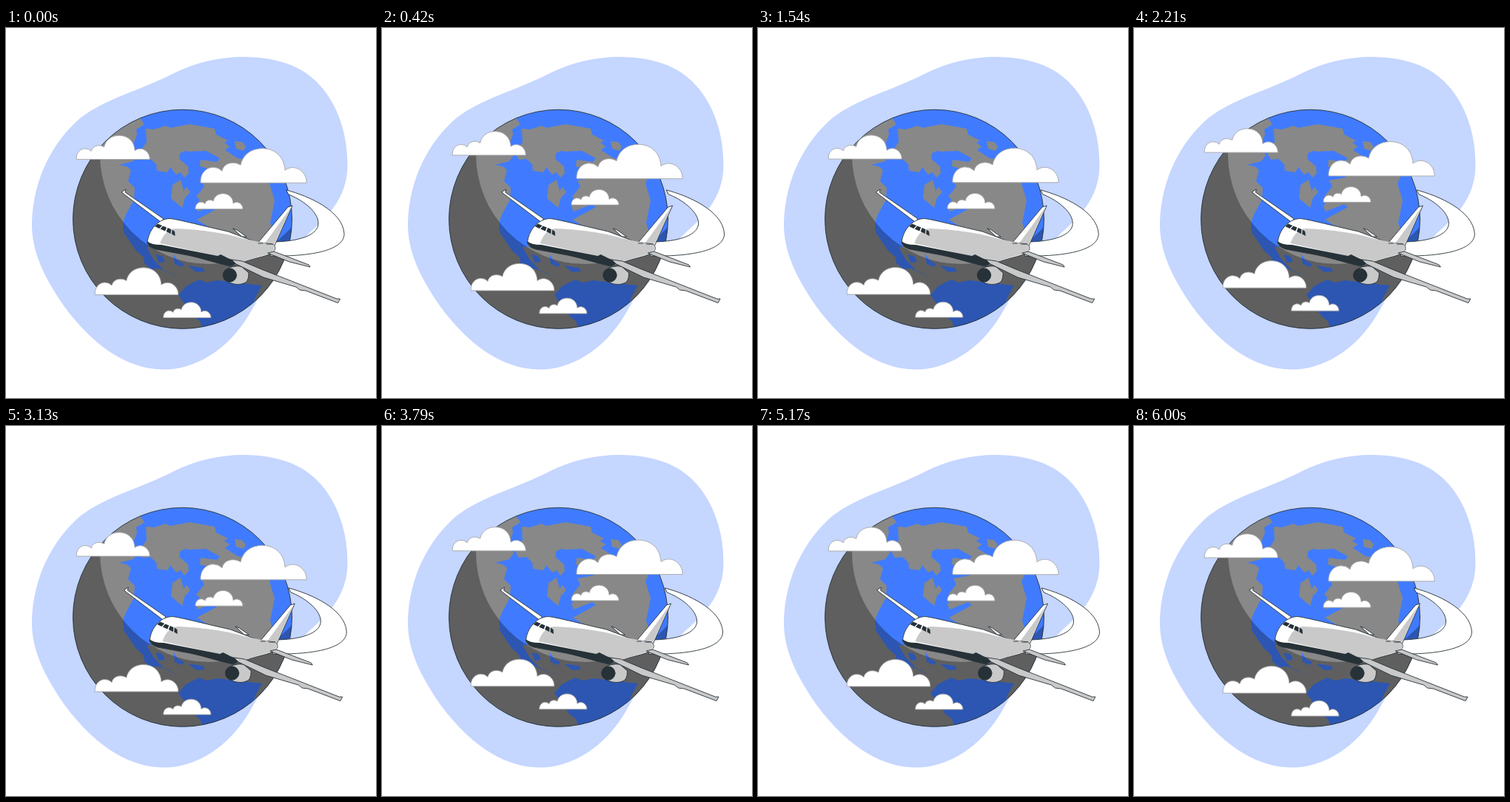
These frames come from a looping animation (500x500 px, 6.04 s). An HTML page:

```html
<!DOCTYPE html>
<html lang="en">
<head>
<meta charset="utf-8">
<title>Plane around the globe</title>
<style>
  html, body { margin: 0; width: 100%; height: 100%; overflow: hidden; background: #fff; }
  svg { display: block; width: 100%; height: 100%; }
  .ink { stroke: #263238; stroke-width: .9; stroke-linejoin: round; stroke-linecap: round; }
  .land { fill: #888; }
  .sea { fill: #407bff; }
  .white { fill: #fff; }
  .gray { fill: #c9c9c9; }
  .dark { fill: #263238; }
  .cloud { fill: #fff; stroke: #a6a6a6; stroke-width: .9; vector-effect: non-scaling-stroke; }
</style>
</head>
<body>
<svg viewBox="0 0 500 500">
  <defs>
    <clipPath id="disc"><circle cx="238.5" cy="258.3" r="148"/></clipPath>
    <path id="puff" class="cloud" d="M0 0C-1 -12 7 -21 17 -21Q24 -21 29 -16C31 -27 45 -30 54 -24C57 -38 68 -46.5 84 -46.5C101 -46 113 -35 114 -17C127 -27 144 -15 143 0Z"/>
  </defs>

  <path fill="#c5d6ff" d="M225 62C275 36 338 32 385 50C435 70 461 125 461.5 183C462 225 440 250 412 275C360 325 345 360 328 388C300 435 255 462 213 461.5C160 461 115 425 80 378C50 335 34 300 35 262C37 205 62 155 100 122C135 95 180 85 225 62Z"/>

  <g clip-path="url(#disc)">
    <rect class="sea" x="88" y="108" width="302" height="302"/>
    <!-- western land -->
    <path class="land" d="M181 121L187 130 176 137 177 144 171 160 178 172 172 180 153 185 163 187 169 192 165 207 174 216 173 232 162 252 158 263 159 276 175 300 186 310 187 318 196 326 207 325 240 340 270 410H60V100Z"/>
    <!-- northern land -->
    <path class="land" d="M189 136L200 137 216 132 222 135 248 130 271 134 282 136 284 144 300 152 295 155 302 160 296 165 313 176 325 178 325 171 365 190 356 210 363 233 357 263 361 276 350 300 300 285 258 259 289 242 284 238 259 248 256 241 262 232 257 228 268 214 264 206 286 202 284 193 262 187 263 178 285 181 289 176 270 166 247 167 241 166 235 170 234 177 246 187 247 196 241 202 236 195 230 198 222 188 218 195 204 193 203 184 195 177 185 178 180 169 190 154Z"/>
    <path class="land" d="M225 212L236 205 240 220 244 215 249 222 242 229 238 243 223 230Z"/>
    <path class="land" d="M309 153L319 154 324 160 321 166 311 163Z"/>
    <!-- southern land -->
    <path class="land" d="M190 296H400V410H230L228 334 213 327 199 312Z"/>
    <path class="sea" d="M243 349L261 340 271 344 286 341 346 348 336 366V410H267L262 396 254 390 233 361Z"/>
    <path class="sea" d="M202 306L211 308 215 315 207 318ZM226 305L232 314 241 319 238 323 228 319ZM246 321L266 324 269 329 257 330Z"/>
    <path class="sea" d="M361 282L372 275 390 266V290L365 291Z"/>
    <path d="M60 80H420V430H60ZM127 171a148 148 0 1 0 296 0a148 148 0 1 0 -296 0Z" fill-rule="evenodd" fill-opacity=".3"/>
  </g>
  <circle class="ink" cx="238.5" cy="258.3" r="148" fill="none"/>

  <g id="clouds"></g>

  <g id="plane">
    <path class="ink white" d="M379 219C409 227 455 247 457 278C457 302 407 309 357 308L359 289C395 289 422 280 422 264C422 247 398 231 382 225Z"/>
    <!-- far wing and far stabilizer -->
    <path class="ink white" d="M156.5 221.5L162 218 161 222 213 258 209 262 160 225Z"/>
    <path class="ink white" d="M307 271L312 273 325 282H319Z"/>
    <!-- tail fin -->
    <path class="ink white" d="M339 292L381 242 387 240 363 294Z"/>
    <path class="gray" d="M349 292L385 242.5 362.5 293Z"/>
    <!-- fuselage -->
    <path class="ink white" d="M191 290C192 274 205 258 221 257.5C230 258 260 266 300 275L337 289 360 292C365 295 365 300 360 303C352 309 340 310 328 314L304 322C285 318 270 312 245 307L202 299Q191 296 191 290Z"/>
    <path class="gray" d="M208 291C212 280 219 271 229 271C255 272 294 276 318 284L359 292.5C364 295 364 300 358 303C350 308 340 309 314 318L298 310 285 308Z"/>
    <path class="dark" d="M191 288Q195 293 210 293L286 308 290 306 300 311 315 317 304 322C287 319 267 312 245 307L202 299Q191 296 191 288Z"/>
    <path class="ink" fill="none" d="M341 291H347M352 292H360"/>
    <!-- cockpit windows -->
    <path class="dark" d="M201 268L205 264.5 211 267 207 271ZM208.5 271.5L212 267.5 217 269.5 215 274.5ZM216.5 275L218.5 270 223 272 222.5 278ZM224 278.5L224.5 272.5 228 275 228.5 281Z"/>
    <!-- near stabilizer -->
    <path class="ink gray" d="M354 304L362 302 409 320 411 323 383 316Z"/>
    <!-- engine -->
    <path class="ink gray" d="M301 324Q314 320 319 323L328 331Q328 344 321 345C314 348 305 346 300 343Z"/>
    <circle class="ink dark" cx="302.3" cy="334" r="9.2"/>
    <!-- near wing -->
    <path class="ink gray" d="M305 313L319 315 345 326 447 366 451.5 366 448.5 371.5 405 355 397 354 392 350 348 337 311 319Z"/>
  </g>
</svg>
<script>
  const LOOP = 6040;
  const clouds = document.getElementById('clouds');
  const plane = document.getElementById('plane');

  // left edge, baseline, width
  const puffs = [[95.2, 178, 99], [263, 209.8, 143], [256, 245.2, 64], [120.2, 361, 112.5], [212.8, 392, 64]];
  clouds.innerHTML = puffs.map(([x, y, w]) =>
    `<use href="#puff" transform="translate(${x} ${y}) scale(${w / 143})"/>`).join('');

  // Shake offsets, one key every 600 ms
  const shake = [-4, 4, -4, 2, -1, 0, -1, 2, -4, 4, -4];

  const shakeAt = ms => {
    const pos = ms / 600;
    const i = Math.min(Math.floor(pos), shake.length - 2);
    return shake[i] + (shake[i + 1] - shake[i]) * (pos - i);
  };

  const floatAt = ms => -10 * (1 - Math.abs((ms % 1500) / 750 - 1));

  function draw(now) {
    const t = now % LOOP;
    const ms = Math.min(40 + t * 5960 / 6000, 6000);
    clouds.setAttribute('transform', `translate(0 ${floatAt(ms)})`);
    plane.setAttribute('transform', `translate(${shakeAt(ms) + 3.5} 0)`);
  }

  const start = performance.now();
  function tick() {
    draw(performance.now() - start);
    requestAnimationFrame(tick);
  }
  draw(0);
  requestAnimationFrame(tick);
</script>
</body>
</html>
```
